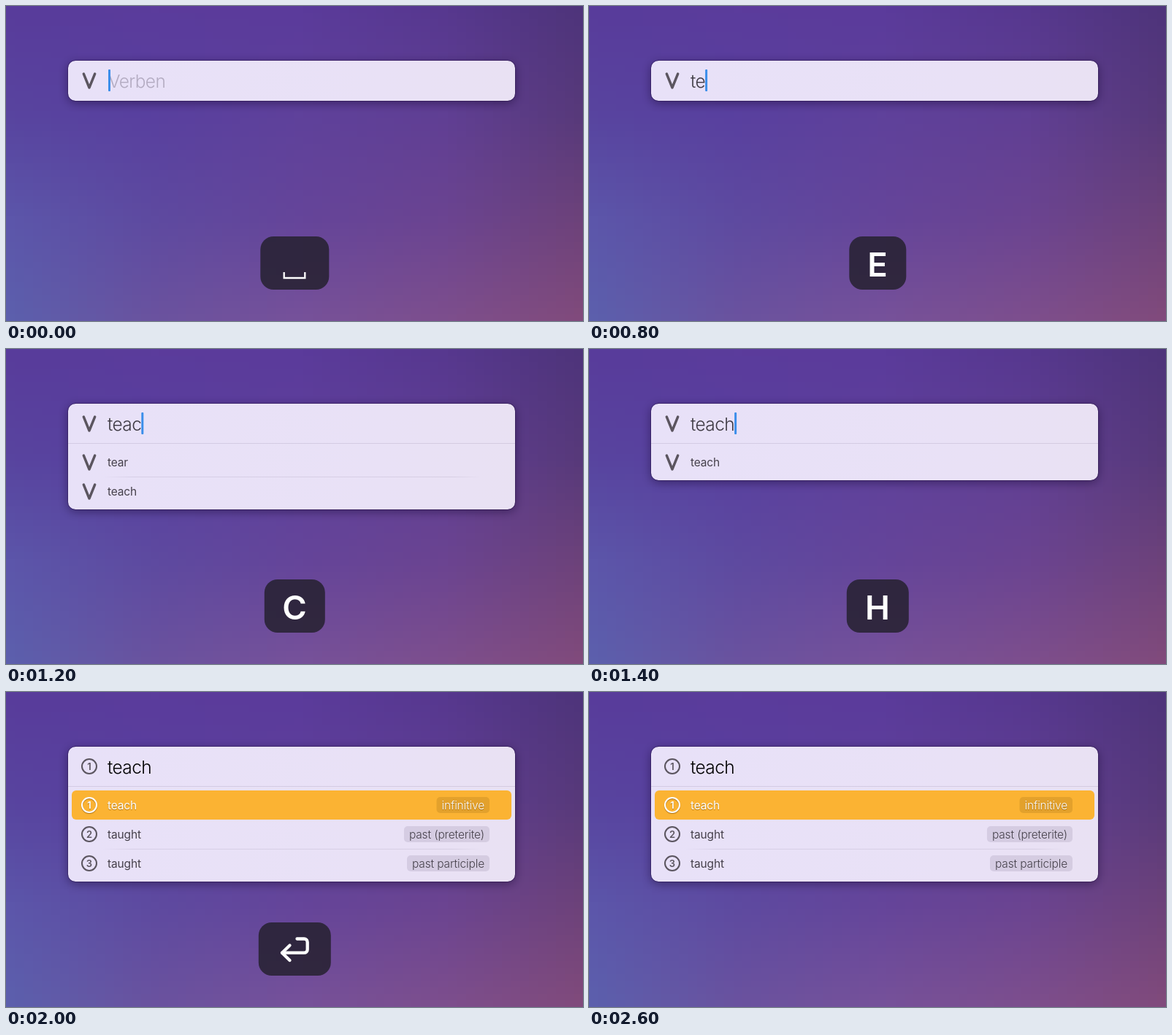
Write an HTML page with a canvas that moves like this. It is 790x432 px and loops after 2.8 s.

```html
<!DOCTYPE html>
<html lang="en">
<head>
<meta charset="utf-8">
<title>Verb lookup</title>
<style>
  html, body { margin: 0; width: 100%; height: 100%; overflow: hidden; background: #5d409a; }
  canvas { display: block; width: 790px; height: 432px; }
</style>
</head>
<body>
<canvas id="stage" width="790" height="432"></canvas>
<script>
const ctx = document.getElementById('stage').getContext('2d');
const STEP = 200, LOOP = 2800;
const PANEL = { x: 85, y: 75, w: 612, bar: 55 };
const GREY = '#5b555f', INK = '#46414b';

// Scenes start at the given time and hold until the next one.
const SUGGESTIONS = ['tend', 'tent', 'term', 'test', 'tempt', 'tenon', 'tense', 'tenant'];
const FORMS = [['teach', 'infinitive'], ['taught', 'past (preterite)'], ['taught', 'past participle']];
const SCENES = [
  { at: 0, query: '', cursor: true, key: 'space' },
  { at: 200, query: '', key: 'space' },
  { at: 400, query: '' },
  { at: 600, query: 't', cursor: true, key: 'T' },
  { at: 800, query: 'te', cursor: true, key: 'E' },
  { at: 1000, query: 'tea', cursor: true, key: 'A', rows: SUGGESTIONS },
  { at: 1200, query: 'teac', cursor: true, key: 'C', rows: ['tear', 'teach'] },
  { at: 1400, query: 'teach', cursor: true, key: 'H', rows: ['teach'] },
  { at: 1600, query: 'teach', cursor: true, rows: ['teach'] },
  { at: 1800, query: 'teach', cursor: true, key: 'return', rows: ['teach'] },
  { at: 2000, query: 'teach', key: 'return', forms: FORMS },
  { at: 2400, query: 'teach', forms: FORMS }
];
const KEY_WIDTH = { space: 94, T: 81, E: 78, A: 82, C: 83, H: 85, return: 99 };

// A coarse colour mesh, smoothly enlarged.
const mesh = document.createElement('canvas');
mesh.width = 5;
mesh.height = 4;
const meshCtx = mesh.getContext('2d');
[
  ['#583c9b', '#5b3c9c', '#5b3b9b', '#57388f', '#4e347a'],
  ['#58449f', '#59409f', '#5f419b', '#603f94', '#573979'],
  ['#5c56aa', '#5e4aa0', '#65459a', '#6b4491', '#6d4279'],
  ['#5c60ad', '#6b539f', '#77529a', '#7e4f8d', '#824b7b']
].forEach((row, y) => row.forEach((color, x) => {
  meshCtx.fillStyle = color;
  meshCtx.fillRect(x, y, 1, 1);
}));

function box(x, y, w, h, r, fill) {
  ctx.beginPath();
  ctx.roundRect(x, y, w, h, r);
  ctx.fillStyle = fill;
  ctx.fill();
}

function line(points, color, width) {
  ctx.beginPath();
  points.forEach(([x, y]) => ctx.lineTo(x, y));
  ctx.strokeStyle = color;
  ctx.lineWidth = width;
  ctx.stroke();
}

function text(str, x, y, { size = 15.5, weight = 400, color = INK, spacing = -0.15, align = 'left' } = {}) {
  ctx.font = `${weight} ${size}px Inter, sans-serif`;
  ctx.letterSpacing = `${spacing}px`;
  ctx.textAlign = align;
  ctx.fillStyle = color;
  ctx.fillText(str, x, y);
  return ctx.measureText(str).width;
}

function verbIcon(y) {
  ctx.lineCap = ctx.lineJoin = 'round';
  line([[106.3, y - 9], [114, y + 10], [121.7, y - 9]], GREY, 3.4);
}

function numberIcon(n, y, color) {
  ctx.beginPath();
  ctx.arc(114, y, 10, 0, Math.PI * 2);
  ctx.strokeStyle = color;
  ctx.lineWidth = 2;
  ctx.stroke();
  text(String(n), 114, y + 4.7, { size: 13, weight: 600, color, spacing: 0, align: 'center' });
}

function divider(y) {
  const fade = ctx.createLinearGradient(132, 0, 652, 0);
  fade.addColorStop(0, 'rgba(60,45,80,0)');
  fade.addColorStop(0.08, 'rgba(60,45,80,.1)');
  fade.addColorStop(0.92, 'rgba(60,45,80,.1)');
  fade.addColorStop(1, 'rgba(60,45,80,0)');
  ctx.fillStyle = fade;
  ctx.fillRect(132, y, 520, 1);
}

function panel(rowCount) {
  const { x, y, w, bar } = PANEL;
  const h = rowCount ? 65 + rowCount * 40 : bar;
  const tint = ctx.createLinearGradient(x, 0, x + w, 0);
  tint.addColorStop(0, '#e8e1f8');
  tint.addColorStop(0.7, '#e9e1f6');
  tint.addColorStop(1, '#e9e1f3');
  ctx.save();
  ctx.shadowColor = 'rgba(20,5,45,.5)';
  ctx.shadowBlur = 14;
  ctx.shadowOffsetY = 3;
  box(x, y, w, h, 10, tint);
  ctx.restore();
  ctx.beginPath();
  ctx.roundRect(x - 0.5, y - 0.5, w + 1, h + 1, 10.5);
  ctx.strokeStyle = 'rgba(35,15,65,.4)';
  ctx.lineWidth = 1;
  ctx.stroke();
  if (rowCount) {
    ctx.fillStyle = 'rgba(60,45,80,.12)';
    ctx.fillRect(x, 129, w, 1);
  }
}

function searchField({ query, cursor, forms }) {
  const style = { size: 24.5, weight: 300, spacing: -0.6, color: forms ? '#000' : '#3e3a43' };
  if (forms) numberIcon(1, 102, GREY);
  else verbIcon(102);
  let width = 1;
  if (query) width = text(query, 139, 112, style);
  else text('Verben', 140, 112, { ...style, color: '#b3abc1' });
  if (cursor) box(139 + width, 87, 3, 30, 1, '#3b8eea');
}

function suggestionRows(rows) {
  rows.forEach((word, i) => {
    const y = 155 + i * 40;
    verbIcon(y);
    text(word, 139, y + 6);
    if (i < rows.length - 1) divider(y + 20);
  });
  if (rows.length > 6) box(689, 135, 4, 200, 2, 'rgba(60,45,80,.025)');
}

function formRows(forms) {
  forms.forEach(([word, label], i) => {
    const y = 155 + i * 40, selected = i === 0;
    const color = selected ? '#fff' : INK;
    if (selected) box(90, 135, 602, 40, 6, '#fbb333');
    ctx.font = '300 15.5px Inter, sans-serif';
    ctx.letterSpacing = '-0.15px';
    const w = ctx.measureText(label).width + 14;
    box(662 - w, y - 11, w, 22, 5, selected ? 'rgba(80,50,0,.14)' : 'rgba(40,25,60,.1)');
    ctx.save();
    if (selected) {
      ctx.shadowColor = 'rgba(90,50,0,.5)';
      ctx.shadowBlur = 1;
      ctx.shadowOffsetY = 1;
    }
    numberIcon(i + 1, y, selected ? '#fff' : GREY);
    text(word, 139, y + 6, { color });
    text(label, 669 - w, y + 6, { weight: 300, color });
    ctx.restore();
  });
  divider(215);
}

function keycap(key) {
  const w = KEY_WIDTH[key];
  box(395.3 - w / 2, 316, w, 73, 18, 'rgba(35,31,43,.82)');
  if (key === 'space') {
    ctx.lineCap = 'butt';
    ctx.lineJoin = 'miter';
    line([[380.7, 365], [380.7, 373], [409.3, 373], [409.3, 365]], '#fff', 2.3);
  } else if (key === 'return') {
    ctx.lineCap = ctx.lineJoin = 'round';
    line([[388.5, 347.5], [378, 357.7], [388.5, 368]], '#fff', 4.3);
    ctx.beginPath();
    ctx.moveTo(398.5, 338.5);
    ctx.arcTo(412.7, 338.5, 412.7, 357.7, 4.5);
    ctx.arcTo(412.7, 357.7, 378, 357.7, 4.5);
    ctx.lineTo(378, 357.7);
    ctx.stroke();
  } else {
    text(key, 395, 370.5, { size: 45.5, weight: 600, color: '#fff', spacing: 0, align: 'center' });
  }
}

function draw(time) {
  const now = Math.floor((time % LOOP) / STEP) * STEP;
  const scene = SCENES.findLast(s => s.at <= now);
  const { rows, forms, key } = scene;
  ctx.drawImage(mesh, 0.5, 0.5, 4, 3, 0, 0, 790, 432);
  panel((rows || forms || []).length);
  searchField(scene);
  if (rows) suggestionRows(rows);
  if (forms) formRows(forms);
  if (key) keycap(key);
}

const start = performance.now();
function tick() {
  draw(performance.now() - start);
  requestAnimationFrame(tick);
}
tick();
</script>
</body>
</html>
```
